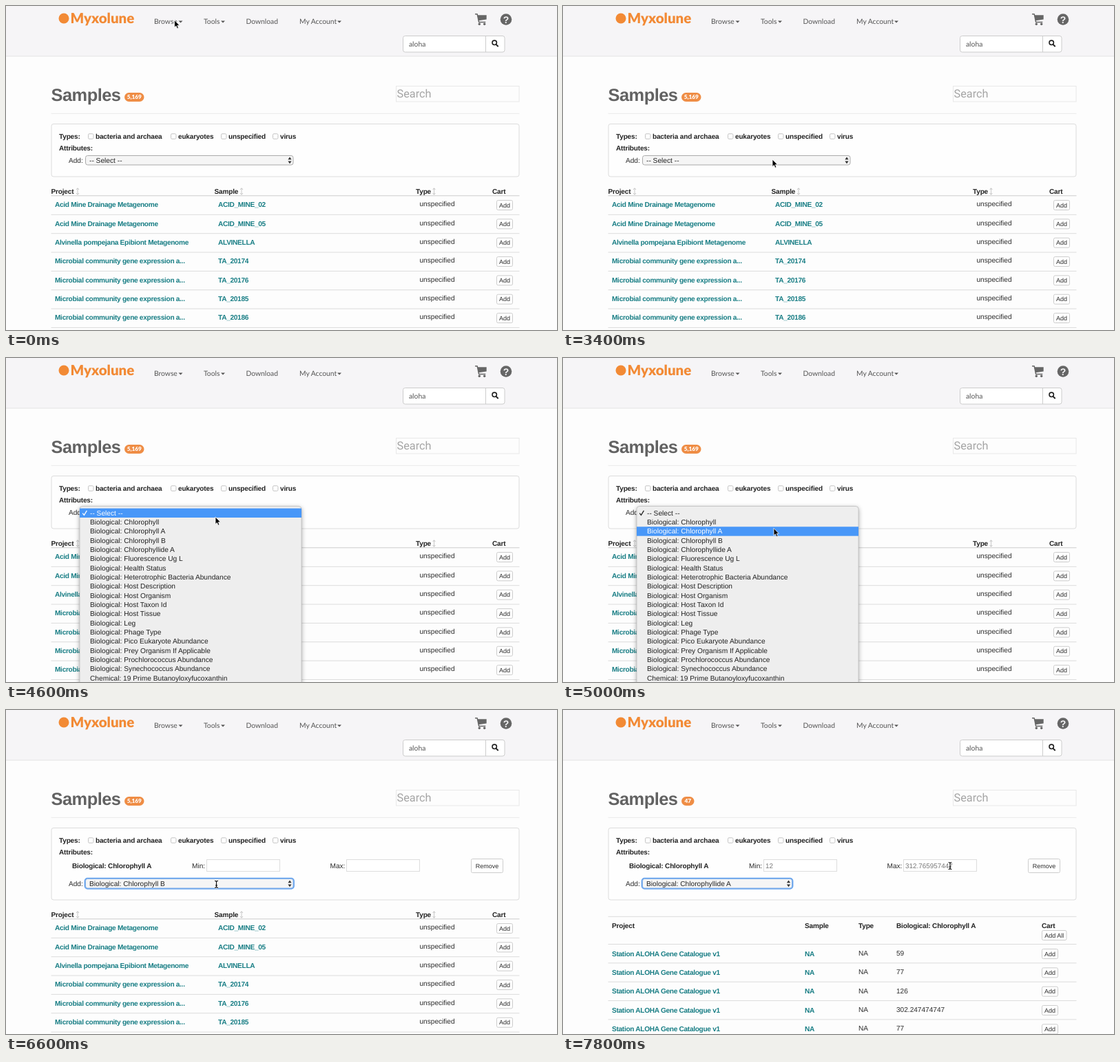
Animation, 800 px wide and 471 px high, one loop 8000 ms. Source, as an HTML page:

```html
<!DOCTYPE html>
<html lang="en">
<head>
<meta charset="utf-8">
<title>Samples</title>
<style>
  html, body { margin: 0; width: 100%; height: 100%; overflow: hidden; background: #fdfdfd; }
  svg { display: block; width: 100%; height: 100%; }
  text { font: 10.1px "Liberation Sans", Arial, sans-serif; fill: #2b2b2b; white-space: pre; text-rendering: geometricPrecision; }
  .bold { font-weight: 700; font-size: 10px; letter-spacing: -.15px; fill: #222; }
  .link { font-weight: 700; font-size: 10.1px; letter-spacing: -.29px; fill: #177d84; }
  .nav { font: 10.3px Lato, sans-serif; fill: #555; }
  .small { font-size: 9px; text-anchor: middle; }
  .brand { font: 900 20.5px Lato, sans-serif; fill: #f28a35; }
  .title { font-weight: 700; font-size: 25.4px; letter-spacing: -.5px; fill: #626262; }
  .badge { font: 900 8.3px Lato, sans-serif; fill: #fff; text-anchor: middle; }
  .search { font: 16.3px Roboto, sans-serif; fill: #a5a5a5; }
  .hint { font-size: 9.9px; fill: #777; }
  .item { font-size: 10.2px; fill: #222; }
</style>
</head>
<body>
<svg id="stage" viewBox="0 0 800 471" preserveAspectRatio="none"></svg>
<script>
const LOOP = 8000, STEP = 200;
const MENU_OPEN = 3600, FILTER_ADDED = 6200, RESULTS_IN = 7400;
const ROW = 27.35, ITEM = 13.34, ITEM_TOP = 218.6;

const text = (x, y, label, cls = '') => `<text x="${x}" y="${y}" class="${cls}">${label}</text>`;
const rect = (x, y, w, h, fill, stroke = 'none', r = 0, more = '') =>
  `<rect x="${x}" y="${y}" width="${w}" height="${h}" rx="${r}" fill="${fill}" stroke="${stroke}" ${more}/>`;
const path = (d, fill, more = '') => `<path d="${d}" fill="${fill}" ${more}/>`;
const line = (y, color = '#dcdcdc') => rect(65.5, y - .5, 680, 1, color);
const group = (id, body) => `<g id="${id}">${body}</g>`;
const button = (x, y, w, h, label) =>
  rect(x + .5, y + .5, w - 1, h - 1, '#fff', '#ccc', 2) + text(x + w / 2, y + h / 2 + 3.2, label, 'small');
const badge = (w, label) =>
  rect(172, 126, w, 13, '#ef8d45', 'none', 6.5) + text(172 + w / 2, 135.4, label, 'badge');
const sortIcon = x =>
  path(`M${x} 265V274M${x - 2} 267L${x} 264.7L${x + 2} 267M${x - 2} 272L${x} 274.3L${x + 2} 272`,
    'none', 'stroke="#bbb" stroke-width=".8"');

function select(y, w, label, focused) {
  const x = 115 + w - 5.5;
  return (focused ? rect(114.8, y, w + .4, 14.5, 'none', '#68a4ee', 3.5, 'stroke-width="2.4"') : '') +
    rect(115.5, y + .5, w - 1, 13.5, '#f5f5f5', focused ? '#86b2e8' : '#aaa', 3) +
    text(121, y + 11, label, 'item') +
    path(`M${x - 2.6} ${y + 6.3}l2.6-3.8l2.6 3.8zM${x - 2.6} ${y + 8.5}l2.6 3.8l2.6-3.8z`, '#333');
}

function header() {
  const caret = x => path(`M${x} 21.6h6l-3 3z`, '#555');
  const wheel = x => `<circle cx="${x}" cy="26.3" r="1.7" fill="#666"/>`;
  const links = [[215, 'Browse'], [287, 'Tools'], [348.5, 'Download'], [426, 'My Account']];
  return rect(0, 0, 800, 73, '#f6f5f7') + rect(0, 72.5, 800, 1, '#e3e3e3') +
    '<circle cx="84" cy="18" r="7.5" fill="#f28a35"/>' + text(93.5, 25, 'Myxolune', 'brand') +
    links.map(([x, label]) => text(x, 26, label, 'nav')).join('') + [250.5, 312, 481].map(caret).join('') +
    path('M681 11.8H684.2L686.6 23.4H696.3', 'none', 'stroke="#666" stroke-width="1.5" stroke-linejoin="round"') +
    path('M684.5 13.3H697.7V19.6L686 21.2Z', '#666') + wheel(687.3) + wheel(694.7) +
    '<circle cx="726" cy="19.5" r="8.3" fill="#666"/>' +
    '<text x="726" y="24.5" text-anchor="middle" style="font-size:14px;font-weight:700;fill:#f6f5f7">?</text>' +
    rect(576.5, 43.5, 147.5, 23.5, '#fff', '#ccc', 3) + rect(696, 43.5, 1, 23.5, '#ccc') +
    text(585, 59, 'aloha', 'nav') +
    path('M711.5 55.9L714.7 59', 'none', 'stroke="#222" stroke-width="2"') +
    '<circle cx="709.2" cy="53.3" r="3.2" fill="none" stroke="#222" stroke-width="1.6"/>';
}

function panel(height, body) {
  const checks = [[119, 'bacteria and archaea'], [239, 'eukaryotes'], [312, 'unspecified'], [387, 'virus']];
  return rect(66, 171.5, 679, height, '#fefefe', '#dcdcdc', 3) +
    text(77, 193, 'Types:', 'bold') + text(77, 209.5, 'Attributes:', 'bold') +
    checks.map(([x, label]) =>
      rect(x + .5, 185.8, 7.4, 7.4, '#fff', '#c4c4c4', 1.5) + text(x + 11, 193, label, 'bold')).join('') + body;
}

function sampleTable() {
  const gene = 'Microbial community gene expression a...', mine = 'Acid Mine Drainage Metagenome';
  const rows = [[mine, 'ACID_MINE_02'], [mine, 'ACID_MINE_05'],
    ['Alvinella pompejana Epibiont Metagenome', 'ALVINELLA'],
    ...[20174, 20176, 20185, 20186].map(n => [gene, 'TA_' + n])];
  const heads = [[65.5, 'Project'], [302.5, 'Sample'], [595, 'Type'], [706, 'Cart']];
  return heads.map(([x, label]) => text(x, 272.5, label, 'bold')).join('') +
    [104, 342, 621.5].map(sortIcon).join('') + line(275.8, '#ccc') +
    rows.map(([project, sample], i) => {
      const y = 276 + ROW * i;
      return text(71, y + 16.2, project, 'link') + text(308, y + 16.2, sample, 'link') +
        text(600.5, y + 15.3, 'unspecified') + button(712, y + 6, 24, 15, 'Add') + line(y + ROW);
    }).join('');
}

function resultTable() {
  const heads = [[71, 'Project'], [351, 'Sample'], [429, 'Type'], [484, 'Biological: Chlorophyll A'], [695, 'Cart']];
  return line(300.3) + heads.map(([x, label]) => text(x, 317, label, 'bold')).join('') +
    button(695, 320, 36.5, 15, 'Add All') + line(340.5) +
    ['59', '77', '126', '302.247474747', '77'].map((value, i) => {
      const y = 340.5 + ROW * i;
      return text(71, y + 17, 'Station ALOHA Gene Catalogue v1', 'link') + text(351, y + 17, 'NA', 'link') +
        text(429, y + 16.3, 'NA') + text(484, y + 16.3, value) +
        button(695, y + 6.5, 24, 15, 'Add') + line(y + ROW);
    }).join('');
}

function menu() {
  const biological = ['Chlorophyll', 'Chlorophyll A', 'Chlorophyll B', 'Chlorophyllide A', 'Fluorescence Ug L',
    'Health Status', 'Heterotrophic Bacteria Abundance', 'Host Description', 'Host Organism', 'Host Taxon Id',
    'Host Tissue', 'Leg', 'Phage Type', 'Pico Eukaryote Abundance', 'Prey Organism If Applicable',
    'Prochlorococcus Abundance', 'Synechococcus Abundance'];
  const items = ['-- Select --', ...biological.map(name => 'Biological: ' + name),
    'Chemical: 19 Prime Butanoyloxyfucoxanthin'];
  return rect(107, 215.5, 322, 270, '#eee', '#bdbdbd', 4,
      'stroke-width=".8" style="filter:drop-shadow(0 2px 3px #0005)"') +
    rect(107, 0, 322, 13.4, '#4897f8', 'none', 0, 'id="highlight"') +
    items.map((label, i) => text(122, 228.6 + ITEM * i, label, 'item')).join('') +
    path('M111.2 225.6L113.4 228.3L117.4 221.8', 'none', 'id="check" stroke-width="1.3"');
}

const filterRow = text(96, 230, 'Biological: Chlorophyll A', 'bold') +
  text(270, 229.5, 'Min:') + rect(291.5, 217.5, 106, 17, '#fff', '#ddd') +
  text(470.5, 229.5, 'Max:') + rect(494.5, 217.5, 106, 17, '#fff', '#ddd') +
  button(675, 216, 47, 21, 'Remove') + text(91, 256, 'Add:');

const stage = document.getElementById('stage');
stage.innerHTML = rect(0, 0, 800, 471, '#fdfdfd') + header() +
  text(65.5, 138.4, 'Samples', 'title') +
  rect(566.5, 116.5, 178.5, 22.5, '#fdfdfd', '#e8e8e8') + text(567.5, 133.3, 'Search', 'search') +
  line(156.3, '#eaeaea') +
  group('plainPanel', panel(76.5, text(91, 228, 'Add:') + select(217, 302.5, '-- Select --', false))) +
  group('filterPanel', panel(104.5, filterRow)) +
  group('wideSelect', select(245, 302.5, 'Biological: Chlorophyll B', true)) +
  group('shortSelect', select(245, 218, 'Biological: Chlorophyllide A', true) +
    text(294, 229.7, '12', 'hint') + text(497, 229.7, '312.765957447', 'hint')) +
  group('samples', badge(28.5, '5,169') + group('sampleRows', sampleTable())) +
  group('results', badge(18.5, '47') + resultTable()) +
  group('menu', menu()) +
  group('arrow', path('M0 0V10.6L2.4 8.4L4 12.2L5.9 11.4L4.3 7.7H7.5Z', '#000', 'stroke="#fff" stroke-width=".8"')) +
  group('beam', ['stroke="#fff" stroke-width="2.6"', 'stroke="#111" stroke-width="1.2"'].map(stroke =>
    path('M-2.4 -5Q0 -5 0 -3.5Q0 -5 2.4 -5M0 -3.5V3.5M-2.4 5Q0 5 0 3.5Q0 5 2.4 5M-1.4 1.6H1.4', 'none', stroke)).join(''));

const el = id => document.getElementById(id);
const show = (id, on) => el(id).setAttribute('display', on ? 'inline' : 'none');
const move = (id, x, y) => el(id).setAttribute('transform', `translate(${x} ${y})`);
const items = [...stage.querySelectorAll('#menu text')];

// Pointer stops: time, x, y
const stops = [[200, 244.5, 20.5], [1400, 295, 206], [1800, 295, 206], [2600, 304, 223], [3600, 304, 223],
  [4400, 304, 231], [4600, 304, 231], [5000, 306, 247.5], [6000, 306, 247.5], [6400, 305.5, 253.3],
  [6800, 305.5, 253.3], [7600, 562, 226.5]];

function pointerAt(t) {
  const next = stops.findIndex(stop => stop[0] > t);
  if (next === 0) return stops[0].slice(1);
  if (next < 0) return stops[stops.length - 1].slice(1);
  const [t0, x0, y0] = stops[next - 1], [t1, x1, y1] = stops[next];
  const p = (t - t0) / (t1 - t0), eased = p * p * (3 - 2 * p);
  return [x0 + (x1 - x0) * eased, y0 + (y1 - y0) * eased];
}

function draw(now) {
  const t = Math.floor(now % LOOP / STEP) * STEP;
  const [x, y] = pointerAt(t);
  const filtered = t >= FILTER_ADDED, done = t >= RESULTS_IN;
  show('plainPanel', !filtered);
  show('filterPanel', filtered);
  show('wideSelect', filtered && !done);
  show('shortSelect', done);
  show('samples', !done);
  show('results', done);
  move('sampleRows', 0, filtered ? 28 : 0);
  show('menu', t >= MENU_OPEN && !filtered);
  const active = Math.max(0, Math.floor((y - ITEM_TOP) / ITEM));
  el('highlight').setAttribute('y', ITEM_TOP + ITEM * active);
  items.forEach((item, i) => { item.style.fill = i === active ? '#fff' : ''; });
  el('check').setAttribute('stroke', active ? '#222' : '#fff');
  show('arrow', !filtered);
  show('beam', filtered);
  move('arrow', x, y);
  move('beam', x, y);
}

function tick() {
  draw(performance.now());
  requestAnimationFrame(tick);
}
tick();
</script>
</body>
</html>
```
